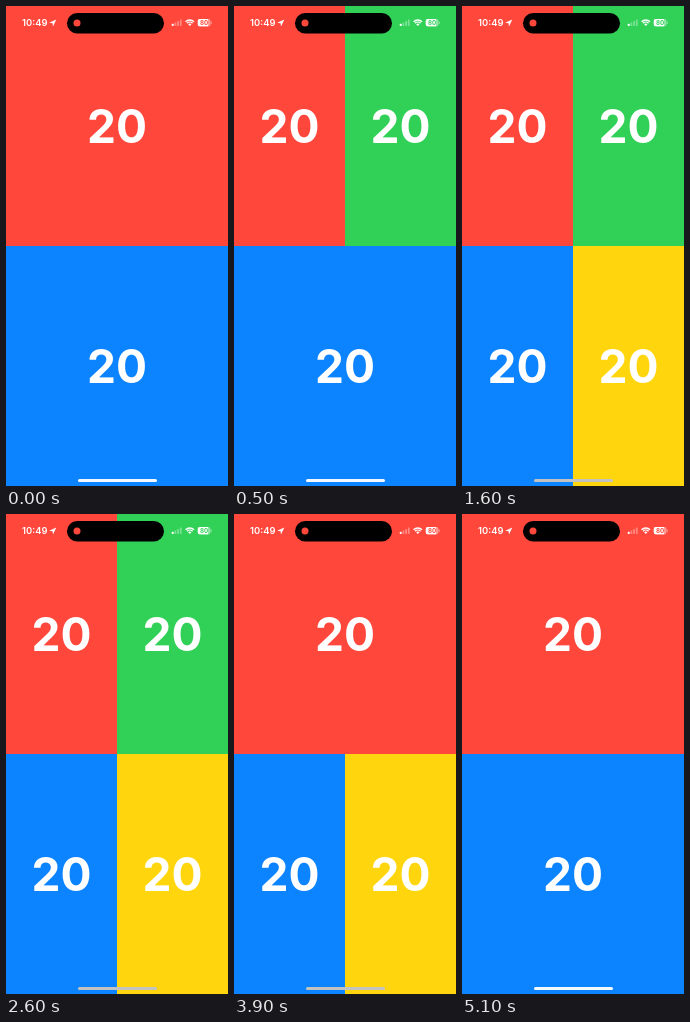
These frames come from a looping animation (222 by 480 pixels, 5.2 s). An HTML page with a canvas:

```html
<!DOCTYPE html>
<html lang="en">
<head>
<meta charset="utf-8">
<style>
  html, body { margin: 0; width: 100%; height: 100%; overflow: hidden; background: #000; }
  canvas { display: block; width: 222px; height: 480px; }
</style>
</head>
<body>
<canvas id="stage"></canvas>
<script>
const W = 222, H = 480, LOOP = 5200;
const RED = '#ff473c', GREEN = '#31d158', BLUE = '#0d84ff', YELLOW = '#ffd60e';
const GREEN_SPAN = [300, 2700], YELLOW_SPAN = [1500, 4000];

const canvas = document.getElementById('stage');
const scale = window.devicePixelRatio || 1;
canvas.width = W * scale;
canvas.height = H * scale;
const ctx = canvas.getContext('2d');
ctx.scale(scale, scale);

const within = (t, [start, end]) => t >= start && t < end;

function pill(x, y, w, h, r, color) {
  ctx.fillStyle = color;
  ctx.beginPath();
  ctx.roundRect(x, y, w, h, r);
  ctx.fill();
}

function label(text, x, y, size, weight, color) {
  ctx.font = `${weight} ${size}px Inter, sans-serif`;
  ctx.textAlign = 'center';
  ctx.textBaseline = 'alphabetic';
  ctx.fillStyle = color;
  ctx.fillText(text, x, y);
}

function panel(x, y, w, color) {
  ctx.fillStyle = color;
  ctx.fillRect(x, y, w, H / 2);
  label('20', x + w / 2, y + 137, 46, 700, '#fff');
}

function row(y, left, right, split) {
  panel(0, y, split ? W / 2 : W, left);
  if (split) panel(W / 2, y, W / 2, right);
}

function locationArrow() {
  ctx.fillStyle = '#fff';
  ctx.beginPath();
  ctx.moveTo(50.3, 13.4);
  ctx.lineTo(43.2, 16.8);
  ctx.lineTo(46.6, 17.2);
  ctx.lineTo(47, 20.5);
  ctx.closePath();
  ctx.fill();
}

function signal() {
  for (let i = 0; i < 4; i++) {
    const h = 2.2 + i * 1.4;
    pill(165.8 + i * 2.7, 20 - h, 1.8, h, 0.5, i < 1 ? '#fff' : 'rgba(255,255,255,.35)');
  }
}

function wifi() {
  const x = 183.8, y = 20, from = -Math.PI * 0.75, to = -Math.PI * 0.25;
  ctx.strokeStyle = ctx.fillStyle = '#fff';
  ctx.lineWidth = 1.3;
  for (const r of [3.9, 6]) {
    ctx.beginPath();
    ctx.arc(x, y, r, from, to);
    ctx.stroke();
  }
  ctx.beginPath();
  ctx.moveTo(x, y);
  ctx.arc(x, y, 2.3, from, to);
  ctx.fill();
}

function battery(ground) {
  const x = 191.6, y = 13.1, w = 13, h = 7.3;
  pill(x, y, w, h, 2.3, 'rgba(255,255,255,.45)');
  ctx.save();
  ctx.beginPath();
  ctx.rect(x, y, w * 0.8, h);
  ctx.clip();
  pill(x, y, w, h, 2.3, '#fff');
  ctx.restore();
  pill(x + w + 0.5, y + 2.4, 0.9, 2.5, 0.5, 'rgba(255,255,255,.45)');
  label('80', x + w / 2, 19, 6.2, 700, ground);
}

function statusBar(ground) {
  label('10:49', 28.7, 20.2, 9.4, 600, '#fff');
  locationArrow();
  pill(61, 7, 97, 20.5, 10.25, '#000');
  pill(67.5, 13.5, 7, 7, 3.5, '#ff473c');
  signal();
  wifi();
  battery(ground);
}

function draw(t) {
  const green = within(t, GREEN_SPAN), yellow = within(t, YELLOW_SPAN);
  row(0, RED, GREEN, green);
  row(H / 2, BLUE, YELLOW, yellow);
  statusBar(green ? GREEN : RED);
  pill(72, 473, 79, 3, 1.5, yellow ? '#c2c2c0' : '#f4f8ff');
}

function tick() {
  draw(performance.now() % LOOP);
  requestAnimationFrame(tick);
}
tick();
</script>
</body>
</html>
```
